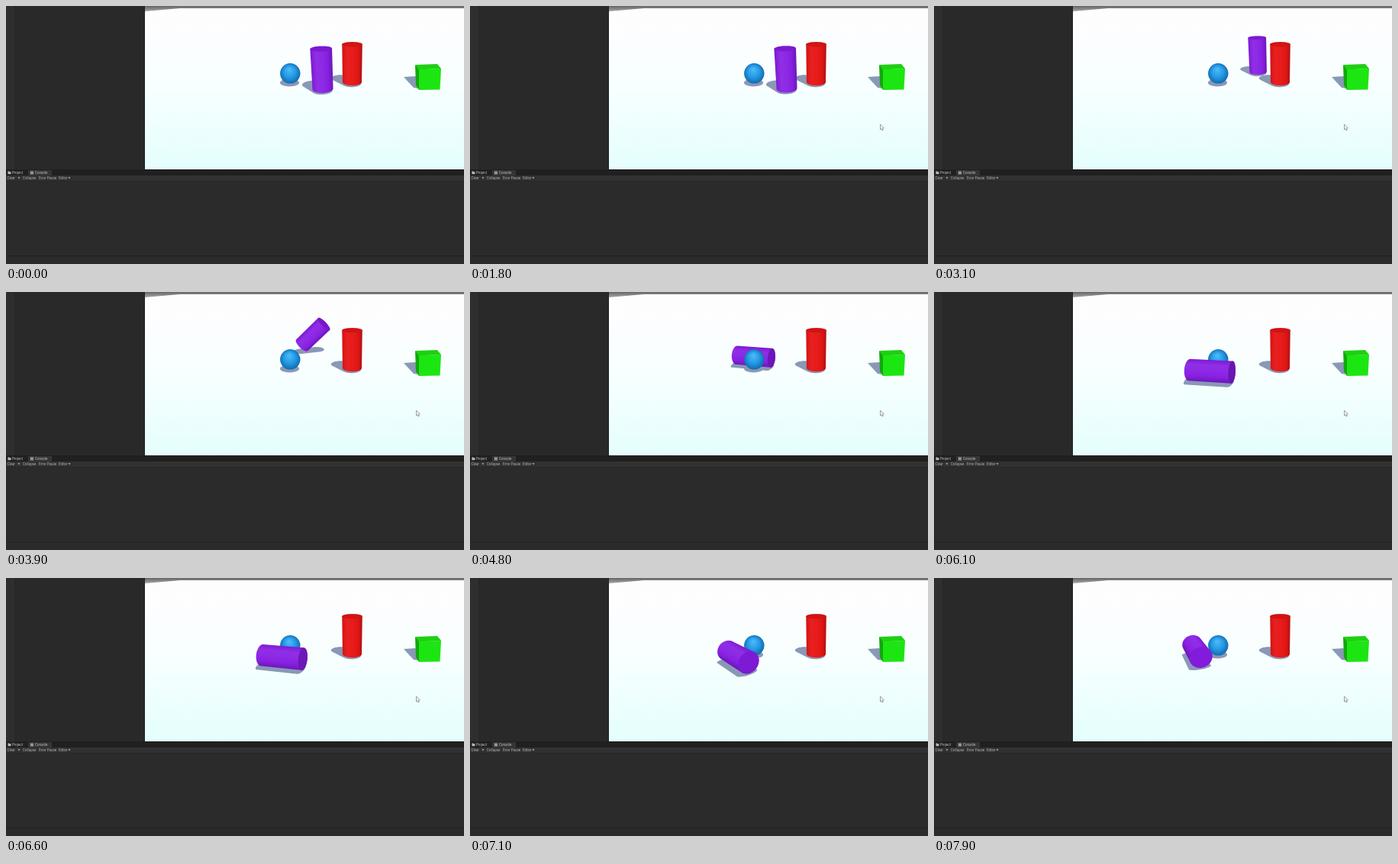
Animation, 600 px wide and 338 px high, one loop 8000 ms. Source, as an HTML page with a canvas:

```html
<!DOCTYPE html>
<html>
<head>
<meta charset="utf-8">
<style>
html, body { margin: 0; width: 100%; height: 100%; overflow: hidden; background: #2b2b2b; }
canvas { display: block; }
</style>
</head>
<body>
<canvas id="stage" width="600" height="338"></canvas>
<script>
const ctx = document.getElementById('stage').getContext('2d');
const LOOP = 8000, STEP = 100;

// Pinhole camera looking down at the floor
const cx = 453, cy = 90, focal = 321, camHeight = 4.84, lift = 0.1;
const sinP = Math.sin(0.35), cosP = Math.cos(0.35);

function project([x, y, z]) {
  const dy = y - camHeight;
  const depth = z * cosP - dy * sinP;
  return [cx + focal * x / depth, cy - focal * (z * sinP + dy * cosP) / depth, depth];
}

function unproject(u, v, y) {
  const s = (v - cy) / focal;
  const depth = (camHeight - y) / (sinP + s * cosP);
  return [(u - cx) / focal * depth, y, depth * (cosP - s * sinP)];
}

const castShadow = ([x, y, z]) => [x - 0.32 * y, 0, z + 0.4 * y];

function hull(points) {
  const sorted = [...points].sort((a, b) => a[0] - b[0] || a[1] - b[1]);
  const chain = list => {
    const out = [];
    for (const p of list) {
      while (out.length > 1) {
        const [a, b] = out.slice(-2);
        if ((b[0] - a[0]) * (p[1] - a[1]) - (b[1] - a[1]) * (p[0] - a[0]) > 0) break;
        out.pop();
      }
      out.push(p);
    }
    return out.slice(0, -1);
  };
  return [...chain(sorted), ...chain(sorted.reverse())];
}

function fillPoly(points, color) {
  ctx.fillStyle = color;
  ctx.beginPath();
  points.forEach(p => ctx.lineTo(p[0], p[1]));
  ctx.fill();
}

function rect(x, y, w, h, color) {
  ctx.fillStyle = color;
  ctx.fillRect(x, y, w, h);
}

function linear(x0, y0, x1, y1, colors) {
  const g = ctx.createLinearGradient(x0, y0, x1, y1);
  colors.forEach((c, i) => g.addColorStop(i / (colors.length - 1), c));
  return g;
}

const SHADOW = '#8998b6';

// Cylinder of height 2 and radius 0.5, placed by the screen position of its centre
function cylinder(u, v, roll, yaw, [hue, sat, light]) {
  const r = roll * Math.PI / 180, w = yaw * Math.PI / 180;
  const sr = Math.sin(r), cr = Math.cos(r), sw = Math.sin(w), cw = Math.cos(w);
  const axis = [sr * cw, cr, -sr * sw];
  const side = [cr * cw, -sr, -cr * sw];
  const back = [sw, 0, cw];
  const center = unproject(u, v, lift + cr + 0.5 * sr);
  const capCenter = end => center.map((c, i) => c + end * axis[i]);
  const ring = end => Array.from({ length: 40 }, (_, k) => {
    const a = k * Math.PI / 20;
    return capCenter(end).map((c, i) => c + 0.5 * (Math.cos(a) * side[i] + Math.sin(a) * back[i]));
  });
  const rings = [...ring(-1), ...ring(1)];
  const shade = k => `hsl(${hue},${sat}%,${light * k}%)`;

  return {
    z: center[2],
    shadow: () => fillPoly(hull(rings.map(p => project(castShadow(p)))), SHADOW),
    draw() {
      const a = project(capCenter(-1)), b = project(capCenter(1)), m = project(center);
      const len = Math.hypot(b[0] - a[0], b[1] - a[1]) || 1;
      const radius = 0.5 * focal / m[2];
      const nx = (a[1] - b[1]) / len * radius, ny = (b[0] - a[0]) / len * radius;
      fillPoly(hull(rings.map(project)), linear(m[0] - nx, m[1] - ny, m[0] + nx, m[1] + ny,
        [shade(0.9), shade(1.04), shade(1.02), shade(0.98), shade(0.78)]));
      const tip = capCenter(1);
      const facing = -axis[0] * tip[0] + axis[1] * (camHeight - tip[1]) - axis[2] * tip[2];
      const end = facing > 0 ? 1 : -1;
      const glow = 0.72 + 0.24 * Math.max(0, -axis[2] * end) + 0.17 * Math.max(0, axis[1] * end);
      fillPoly(ring(end).map(project), shade(glow));
    }
  };
}

const sphere = {
  z: unproject(372, 88, 0.5 + lift)[2],
  shadow() {
    ctx.fillStyle = SHADOW;
    ctx.beginPath();
    ctx.ellipse(371.5, 100.5, 12.5, 5, 0, 0, 7);
    ctx.fill();
  },
  draw() {
    const g = ctx.createRadialGradient(371, 83, 1, 372, 88, 13.5);
    g.addColorStop(0, '#4cb9f6');
    g.addColorStop(0.55, '#2499e6');
    g.addColorStop(1, '#126cae');
    ctx.fillStyle = g;
    ctx.beginPath();
    ctx.arc(372.3, 88.3, 13.2, 0, 7);
    ctx.fill();
  }
};

const cube = {
  z: 0,
  shadow: () => fillPoly([[521, 93], [536, 92], [546, 98], [546, 109], [534, 107]], SHADOW),
  draw() {
    fillPoly([[536, 77], [542, 83], [541, 110], [537, 104]], '#12a70f');
    fillPoly([[536, 77], [565, 76], [570, 82], [541, 83.5]], '#1fcf14');
    fillPoly([[541, 83], [570, 82], [568.5, 109.5], [541, 110]], '#1ce612');
  }
};

const RED = [0, 82, 50], PURPLE = [272, 78, 52];
const red = cylinder(453.5, 75.5, 0, 0, RED);

// time, centre x, centre y, roll, yaw
const path = [
  [0, 414, 83, 0, 0], [2400, 414, 82.5, 0, 0], [3100, 424, 64.5, 0, 0],
  [3500, 418, 44, 0, 0], [4100, 394, 62, 70, 8], [4700, 372, 84.5, 90, 13],
  [5000, 372, 84.5, 90, 13], [5300, 318, 102, 90, 10], [5600, 266, 125, 90, 9],
  [5750, 282, 160, 90, 8], [5900, 283, 138, 90, 8], [6100, 362.5, 103.5, 90, 8],
  [6700, 362, 103.5, 90, 14], [7100, 350.5, 102.5, 90, 46], [7400, 264, 109, 90, 46],
  [7700, 312, 98, 90, 54], [7900, 344, 95, 90, 61]
];

function pose(t) {
  const i = path.findIndex(k => k[0] > t);
  if (i < 0) return path[path.length - 1].slice(1);
  const a = path[i - 1], b = path[i], k = (t - a[0]) / (b[0] - a[0]);
  return a.map((n, j) => n + (b[j] - n) * k).slice(1);
}

function label(text, x, y, color) {
  ctx.font = '4.5px Roboto, sans-serif';
  ctx.fillStyle = color;
  ctx.fillText(text, x, y);
}

function editor() {
  rect(0, 0, 182, 214, '#292929');
  rect(0, 0, 11, 214, '#2e2e2e');
  rect(11, 0, 1, 214, '#262626');
  rect(181, 0, 1, 214, '#222');
  rect(0, 214, 600, 8, '#202020');
  rect(29, 215, 31, 7, '#353535');
  rect(0, 222, 600, 8, '#313131');
  rect(0, 229, 600, 1, '#272727');
  rect(0, 230, 600, 108, '#2b2b2b');
  rect(0, 327, 600, 1, '#1f1f1f');
  rect(2.5, 216.5, 2, 1, '#bbb');
  rect(2.5, 217.2, 4, 3, '#bbb');
  rect(32, 216.5, 4, 4, '#aaa');
  rect(33, 217.5, 2.5, 0.5, '#444');
  rect(33, 219, 2.5, 0.5, '#444');
  label('Project', 8, 220.2, '#bcbcbc');
  label('Console', 38, 220.2, '#bcbcbc');
  label('Clear', 1.5, 227.2, '#b2b2b2');
  label('Collapse', 22, 227.2, '#b2b2b2');
  label('Error Pause', 43, 227.2, '#b2b2b2');
  label('Editor', 69, 227.2, '#b2b2b2');
  for (const x of [15.5, 81.5]) fillPoly([[x, 224.3], [x + 3, 224.3], [x + 1.5, 226.5]], '#b2b2b2');
}

function cursor() {
  fillPoly([[537.5, 155], [537.5, 162], [539, 160.8], [540, 163], [541.2, 162.4], [540.2, 160.3], [542.3, 160]], '#fafafa');
  ctx.strokeStyle = '#777';
  ctx.lineWidth = 0.7;
  ctx.closePath();
  ctx.stroke();
}

function render(t) {
  rect(182, 0, 418, 214, linear(0, 4, 0, 214, ['#fffdfe', '#f7ffff', '#e4fefd']));
  fillPoly([[182, 0], [600, 0], [600, 3], [228, 3], [182, 7]], linear(0, 0, 0, 7, ['#666', '#858585', '#aaa']));
  const objects = [red, sphere, cube, cylinder(...pose(t), PURPLE)];
  objects.sort((a, b) => b.z - a.z);
  objects.forEach(o => o.shadow());
  objects.forEach(o => o.draw());
  editor();
  if (t >= 700) cursor();
}

function tick() {
  render(Math.floor(performance.now() % LOOP / STEP) * STEP);
  requestAnimationFrame(tick);
}
tick();
</script>
</body>
</html>
```
